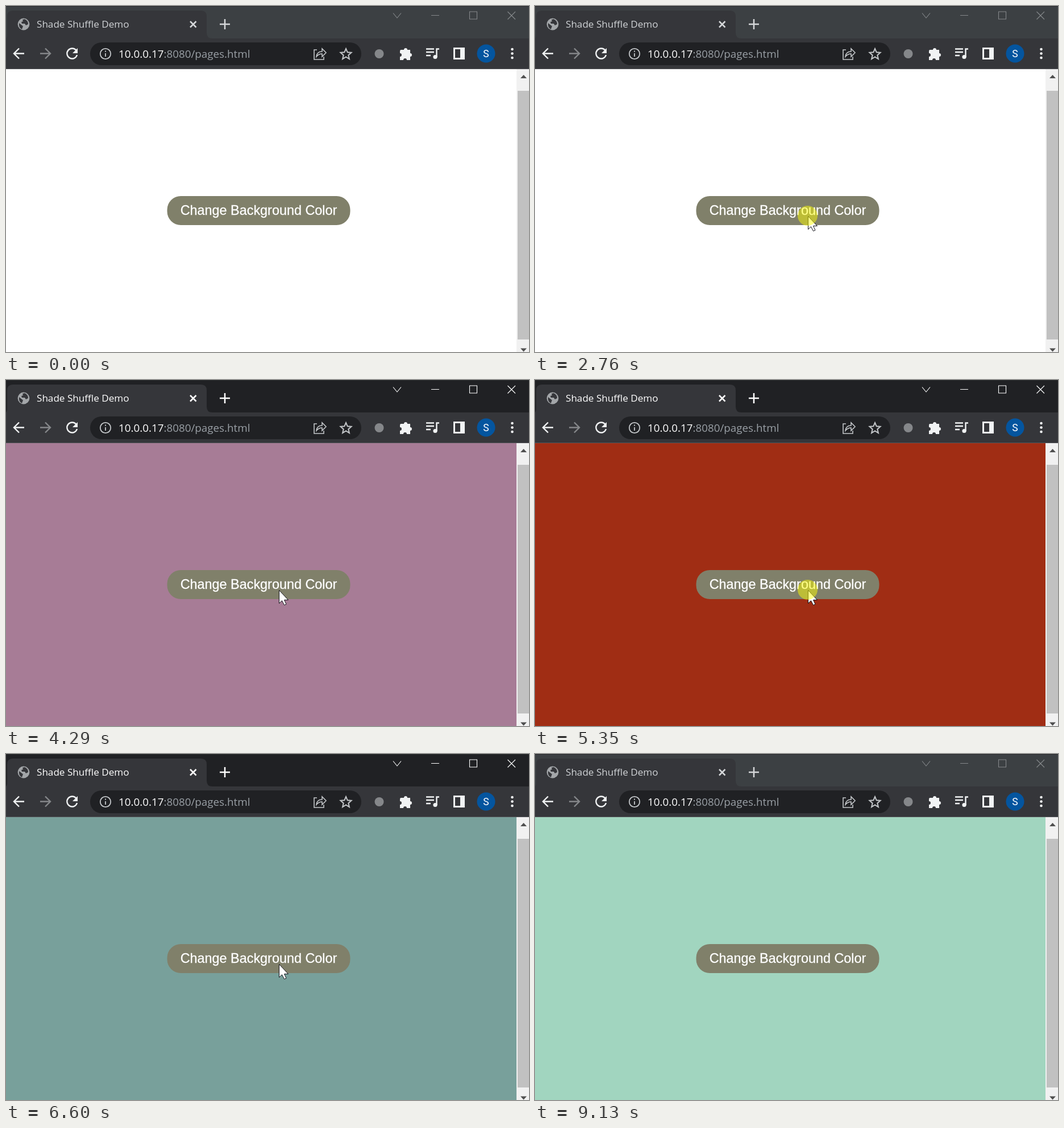
Recreate the animation shown at these times as an HTML page. Size 920x608 px, loop 9330 ms.

```html
<!DOCTYPE html>
<html lang="en">
<head>
<meta charset="utf-8">
<title>Shade Shuffle Demo</title>
<style>
  html, body { margin: 0; width: 100%; height: 100%; overflow: hidden; }
  svg { display: block; width: 920px; height: 608px; }
  text { white-space: pre; }
  .ui { font-family: "Open Sans", "Noto Sans", sans-serif; }
  .line { fill: none; stroke: #f1f3f4; stroke-width: 2.4; }
  .soft { stroke: #c4c7ca; stroke-width: 1.8; }
  .solid { fill: #f1f3f4; }
  #strip { fill: #3c4043; }
  #caption { fill: #d0d3d6; }
  #tabIcons { stroke: #d5d7d9; }
  #controls { fill: none; stroke: #85888b; stroke-width: 1.1; }
  #label { fill: #fff; stroke: #fff; stroke-width: .3; }
  .active #strip { fill: #202124; }
  .active #caption { fill: #fff; }
  .active #tabIcons, .active #controls { stroke: #fff; }
</style>
</head>
<body>
<svg id="stage" viewBox="0 0 920 608">
  <rect id="page" y="110" width="920" height="498" fill="#fff"/>

  <g id="tabs">
    <rect id="strip" width="920" height="58"/>
    <rect width="920" height="1" fill="#292b2d"/>
    <path d="M0 57Q2 56 2 48V18Q2 8 12 8H343Q353 8 353 18V47Q353 57 363 57Z" fill="#35363a"/>
    <circle cx="31" cy="32" r="10.4" fill="#a3a6a9"/>
    <path d="M23 30l5 4q3 1 1 4l-1 3q-6-3-5-11M29 24l4-1q6 3 6 9l-4 2-2-3h-5l-1-3 3-1Z" fill="#35363a"/>
    <text id="caption" class="ui" x="54" y="38" font-size="17.1">Shade Shuffle Demo</text>
    <path id="tabIcons" d="M324 27l10.5 10.5m0-10.5L324 37.5M376 32h18m-9-9v18" fill="none" stroke-width="2.5"/>
    <path id="controls" d="M681 12.5l7 8.500 7-8.500M748 16.500h14M815.500 10h13v13h-13ZM882.500 10l13.500 13.500m0-13.500L882.500 23.500"/>
  </g>

  <g id="toolbar">
    <rect y="57" width="920" height="54" fill="#35363a"/>
    <rect y="110" width="920" height="1" fill="#55565a"/>
    <path class="line" d="M32 83.500H14m9-9l-9 9 9 9"/>
    <path class="line" d="M60 83.500h18m-9-9l9 9-9 9" style="stroke:#85878a"/>
    <path class="line" d="M123.500 78A9 9 0 1 0 125 86"/>
    <path class="solid" d="M126 74v9h-9Z"/>

    <rect x="148" y="64" width="477" height="40" rx="20" fill="#202124"/>
    <circle class="line soft" cx="175" cy="84" r="9.200"/>
    <path class="line soft" d="M175 83v6m0-10.500v2.300"/>
    <text class="ui" x="198" y="91" font-size="18.8" fill="#fff">10.0.0.17<tspan fill="#9aa0a6">:8080/pages.html</tspan></text>
    <path class="line soft" d="M547 77h-5v17h17v-5M546 89q1-9 10-9v-5l7 7-7 7v-5q-6 0-10 5Z" style="stroke-width:1.6"/>
    <path class="line soft" d="M598 75l2.700 6.300 6.800.600-5.200 4.500 1.600 6.700-5.900-3.600-5.900 3.600 1.600-6.700-5.200-4.500 6.800-.600Z" style="stroke-width:2"/>

    <circle cx="656.500" cy="84" r="8" fill="#85878a"/>
    <path class="solid" d="M695 77h5a3 3 0 1 1 6 0h5v6a3 3 0 1 1 0 6v6h-6a3 3 0 0 0-6 0h-6v-6a3 3 0 0 0 0-6v-4q0-2 2-2Z"/>
    <path class="line" d="M739 75.500h14m-14 5.500h14m-14 6h8M757.500 90V75.500h4.500"/>
    <circle class="solid" cx="755" cy="89.500" r="3.600"/>
    <path class="solid" fill-rule="evenodd" d="M787 73h20v21h-20ZM790 76v15h9V76Z"/>
    <circle cx="844.500" cy="83.500" r="16" fill="#04559f"/>
    <text x="844.500" y="90" font-family="Roboto, sans-serif" font-size="17.5" text-anchor="middle" fill="#fff">S</text>
    <g class="solid">
      <circle cx="890.500" cy="76" r="2.300"/>
      <circle cx="890.500" cy="83.500" r="2.300"/>
      <circle cx="890.500" cy="91" r="2.300"/>
    </g>
  </g>

  <g id="scrollbar">
    <rect x="898" y="111" width="22" height="497" fill="#f1f1f1"/>
    <rect x="900" y="149" width="20" height="437" fill="#c1c1c1"/>
    <path d="M905 127l5.500-6 5.500 6ZM905 601.500h11l-5.500 6Z" fill="#505050"/>
  </g>

  <rect x="283.500" y="334" width="322" height="51" rx="24" fill="#80806a"/>
  <text id="label" x="444.500" y="367.300" font-family="'Liberation Sans', Arial, sans-serif" font-size="23.4" text-anchor="middle">Change Background Color</text>

  <path id="cursor" d="M.5.500V23.500L5.500 18.800 9.500 26.500 13 25 9.500 17.500H16.500Z" fill="#fff" stroke="#15151c"/>
  <circle id="press" cx="479.500" cy="368.500" r="17.500" fill="#ff0" fill-opacity=".48"/>
</svg>

<script>
const LOOP = 9330;
const byId = id => document.getElementById(id);
const stage = byId('stage'), page = byId('page'), cursor = byId('cursor'), press = byId('press');

// time, page colour, mouse button down
const clicks = [
  [0, '#fff', 0], [2760, '#fff', 1], [2930, '#dedfa2', 1], [3020, '#dedfa2', 0],
  [3430, '#dedfa2', 1], [3620, '#7fa08c', 0],
  [4080, '#7fa08c', 1], [4290, '#a77c96', 0],
  [4750, '#a77c96', 1], [4950, '#6f8f72', 0],
  [5160, '#6f8f72', 1], [5255, '#8b78a8', 0], [5350, '#a02d14', 1],
  [5490, '#927f60', 0], [5680, '#608f8c', 1], [5880, '#a58a74', 0], [6060, '#588fad', 1],
  [6260, '#8d9a62', 0], [6460, '#8a6b92', 1], [6600, '#78a09b', 0],
  [6880, '#a8876b', 1], [6980, '#6c7fa0', 1], [7250, '#489f06', 0],
  [7550, '#489f06', 1], [7730, '#a1d5bf', 0]
];

const enter = [[838, 256], [700, 330], [520, 413], [480, 369]];
const leave = [[480, 369], [315, 520], [480, 600], [793, 595]];

function bezier(points, u) {
  const v = 1 - u;
  const weights = [v * v * v, 3 * v * v * u, 3 * v * u * u, u * u * u];
  return [0, 1].map(axis =>
    Math.round(points.reduce((sum, p, i) => sum + p[axis] * weights[i], 0)));
}

function cursorAt(t) {
  if (t < 1460 || t >= 8600) return null;
  if (t < 8120) {
    const u = Math.min(12, Math.floor((t - 1460) * 12 / 830)) / 12;
    return bezier(enter, u * u * (3 - 2 * u));
  }
  return bezier(leave, (1 + Math.floor((t - 8120) * 7 / 480)) / 7);
}

function draw(t) {
  const [, colour, down] = clicks.findLast(step => step[0] <= t);
  const tip = cursorAt(t);
  page.setAttribute('fill', colour);
  press.style.display = down ? '' : 'none';
  cursor.style.display = tip ? '' : 'none';
  if (tip) cursor.setAttribute('transform', `translate(${tip})`);
  stage.classList.toggle('active', t >= 2845 && t < 9130);
}

const start = performance.now();
function tick() {
  draw((performance.now() - start) % LOOP);
  requestAnimationFrame(tick);
}
tick();
</script>
</body>
</html>
```
